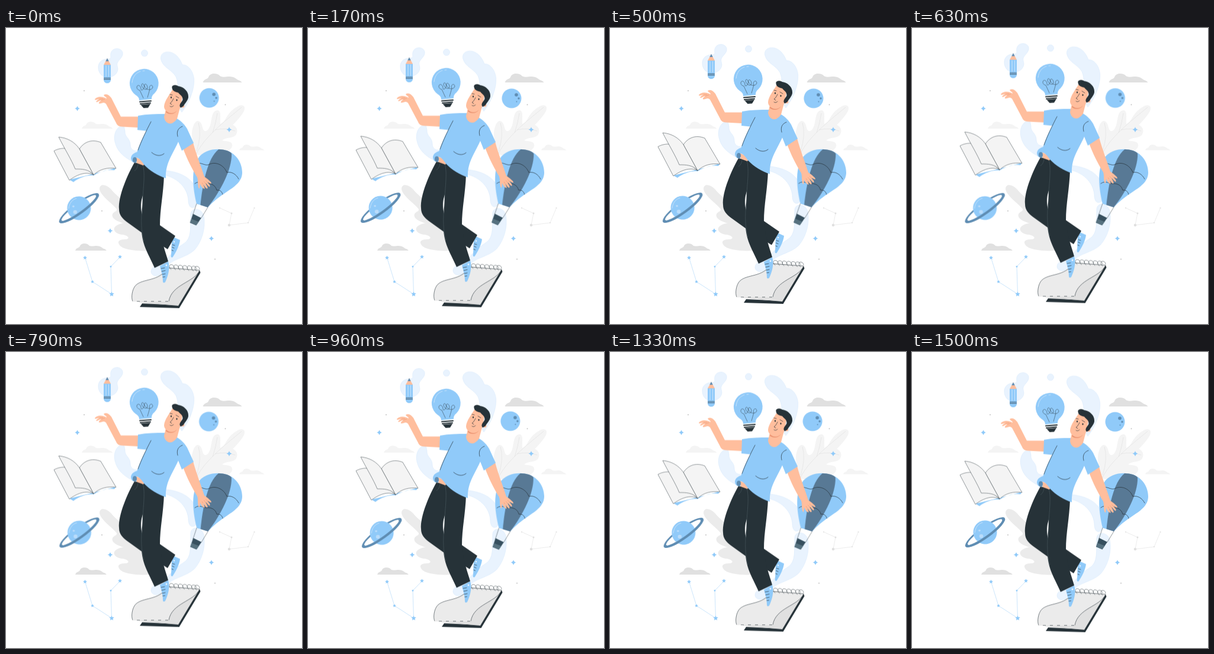
Recreate the animation shown at these times as an HTML page. Size 500 by 500 pixels, loop 1.54 s.

```html
<!DOCTYPE html>
<html lang="en">
<head>
<meta charset="utf-8">
<title>Floating ideas</title>
<style>
html, body { margin: 0; width: 100%; height: 100%; overflow: hidden; background: #fff; }
svg { display: block; width: 100vw; height: 100vh; }
.bob, .moon, .ringed, .balloon {
  animation: 770ms cubic-bezier(.37, 0, .63, 1) -435ms infinite alternate;
}
.bob { animation-name: bob; animation-delay: -45ms; }
.moon { animation-name: moon; }
.ringed { animation-name: ringed; }
.balloon { animation-name: balloon; transform-origin: 360px 245px; }
@keyframes bob { from { transform: translateY(.3px) } to { transform: translateY(-8.7px) } }
@keyframes moon { from { transform: translate(-1.4px, -1.4px) } to { transform: translate(1.2px, 1.1px) } }
@keyframes ringed { from { transform: translate(1.3px, 1.4px) } to { transform: translate(-1.2px, -1.2px) } }
@keyframes balloon { from { transform: rotate(-.7deg) } to { transform: rotate(.7deg) } }
.blue { fill: #90caf9 }
.steel { fill: #5f8db3 }
.dark { fill: #263238 }
.skin { fill: #ffbe9d }
.pale { fill: #e9f3fe; stroke: #d3e7fb; stroke-width: .5 }
.page { fill: #f4f4f4; stroke: #263238; stroke-width: .5; stroke-linejoin: round }
.ink { fill: none; stroke: #263238; stroke-width: .7; stroke-linecap: round; stroke-linejoin: round }
.fine { stroke-width: .5 }
.bold { stroke-width: 2 }
.vein { fill: none; stroke: #e0e0e0; stroke-width: .6 }
.glow { fill: none; stroke: #c8e4fc; stroke-width: 1; stroke-linecap: round }
</style>
</head>
<body>
<svg viewBox="0 0 500 500">
  <defs>
    <path id="cloud" d="M0 0C3 -8 8 -4 10 -10C13 -17 25 -16 29 -11C33 -8 40 -10 45 -10C53 -10 56 -6 60 -4C64 -3 65 -1 66 0Z"/>
    <path id="spark" d="M0 -4.6Q.9 -.9 4.6 0Q.9 .9 0 4.6Q-.9 .9 -4.6 0Q-.9 -.9 0 -4.6Z"/>
    <path id="star" d="M0 -4L1.2 -1.4L4 -1.1L1.9 .8L2.5 3.6L0 2.2L-2.5 3.6L-1.9 .8L-4 -1.1L-1.2 -1.4Z"/>
    <path id="loop" class="ink fine" d="M3 8C-1 6 -1 0 3 0C6 0 8 2 8 5"/>
  </defs>

  <!-- flowing backdrop -->
  <g class="bob pale">
    <path d="M177 49C174 32 194 31 197 41C199 51 185 55 188 64C192 75 182 83 172 83C160 83 155 73 156 64C158 53 168 52 174 52Q177 52 177 49Z"/>
    <circle cx="234" cy="42.300" r="5.500"/>
    <path d="M262 54C259 43 269 38 279 41C289 44 295 54 298 62C307 61 316 72 317.500 85C319 105 308 128 297 142L283 120C291 106 292 94 287 82C280 70 266 67 262 54Z"/>
    <path d="M199 164C187 166 181 178 184 192C187 207 199 219 216 226L240 226L235 205C218 211 210 206 210 197C210 186 200 184 201 174Z"/>
    <path d="M262 240C284 241 303 247 314 260C324 272 327 292 319 302C312 306 308 300 308 290C306 268 288 251 262 247Z"/>
    <path d="M312 314C313 302 331 304 334 317C338 339 330 361 319 374C304 389 279 389 270 405C264 421 247 422 245 412C245 400 259 403 270 393C281 376 289 372 303 362C314 352 311 335 312 314Z"/>
  </g>

  <!-- leaves -->
  <path fill="#f4f4f4" d="M322 214C319 200 310 183 316 167C320 153 329 154 332 168C334 177 340 176 344 167C348 158 346 140 357 139C365 139 361 154 362 162C370 160 372 147 382 139C391 131 400 127 403 134C404 142 394 152 383 164C390 166 393 174 388 181C383 187 371 184 365 190C371 192 384 190 382 200C379 210 360 210 348 218Z"/>
  <path class="vein" d="M322 212C334 186 366 160 398 134M322 208Q331 180 325 160M349 177Q354 163 357 144M353 172Q371 168 387 174"/>
  <path fill="#ebebeb" d="M158 271C159 262 170 264 178 273C188 285 199 290 206 308L234 320L266 336L268 368C258 379 207 379 194 369C185 360 192 357 202 357C211 356 206 350 196 349C185 348 179 340 185 335C190 331 195 330 199 330C189 327 177 322 180 314C182 310 188 310 187 306C181 297 158 283 158 271Z"/>

  <!-- sky -->
  <g fill="#e0e0e0">
    <use href="#cloud" x="332.500" y="92"/>
    <use href="#cloud" transform="translate(117 376) scale(.8)"/>
    <g fill="#f4f4f4">
      <use href="#cloud" transform="translate(128 170) scale(.79)"/>
      <use href="#cloud" transform="translate(394 206.500) scale(.64)"/>
    </g>
    <path class="vein" d="M361 304L381 313L377 333L409 329L419.500 304"/>
    <circle cx="361" cy="304" r="1"/><circle cx="381" cy="313" r="1.500"/>
    <circle cx="377" cy="333" r="2.300"/><circle cx="409" cy="329" r="1"/><circle cx="419.500" cy="304" r="1"/>
  </g>
  <g fill="#bdbdbd">
    <circle cx="132" cy="106" r=".9"/><circle cx="370.500" cy="129.500" r=".9"/>
    <circle cx="162" cy="309" r=".9"/><circle cx="353" cy="390.500" r=".9"/>
  </g>
  <g class="blue">
    <use href="#spark" x="120.500" y="136"/><use href="#spark" x="377" y="171.700"/>
    <use href="#spark" x="176" y="342.500"/><use href="#spark" x="347" y="355.500"/>
    <path fill="none" stroke="#b5dafa" stroke-width=".7" d="M133.500 388L146 428.500L178.500 449.500L177 403L192.500 387"/>
    <use href="#star" transform="translate(133.500 388) scale(.85)"/>
    <use href="#star" transform="translate(146 428.500) scale(.7)"/>
    <use href="#star" transform="translate(178.500 449.500) scale(1.05)"/>
    <use href="#star" transform="translate(177 403) scale(.5)"/>
    <use href="#star" transform="translate(192.500 386.500) scale(.85)"/>
  </g>

  <!-- planets -->
  <g class="moon">
    <circle class="blue" cx="343" cy="118" r="16.500"/>
    <circle class="steel" cx="351" cy="112" r="2.800"/><circle class="steel" cx="355" cy="118" r="1.700"/>
    <circle class="steel" cx="351.500" cy="123.500" r=".9"/>
  </g>
  <g class="ringed">
    <g transform="translate(123.500 304.500) rotate(-36)">
      <path class="steel" fill-rule="evenodd" d="M-41 0A41 10 0 0 1 41 0A41 10 0 0 1 -41 0ZM-36 -.5A36 6.500 0 0 0 36 -.5A36 6.500 0 0 0 -36 -.5Z"/>
      <circle class="blue" r="20"/>
      <path class="steel" d="M-41 0A41 10 0 0 0 41 0L36 -.5A36 6.500 0 0 1 -36 -.5Z"/>
    </g>
    <path class="glow" d="M106 305C107 296 112 290 119 288"/>
    <circle cx="114" cy="301.500" r="1.800" fill="#b9dcfb"/><circle cx="117" cy="311" r="3.300" fill="#b9dcfb"/>
  </g>

  <!-- balloon -->
  <g class="balloon">
    <path class="blue" d="M322 297C316 272 312 240 324 221C332 208 348 204 362 205C385 206 399 225 399 244C399 258 388 267 374 276C360 285 349 294 341 303Z"/>
    <path fill="#587995" d="M359 205C370 205 378 208 381 212C382 239 362 276 341 303L328.500 299C332 264 340 220 359 205Z"/>
    <path class="ink" d="M320 229C329 225 337 235 344 230C356 225 369 233 373 244C381 242 389 247 393 255M319 263C326 257 333 263 338 263C347 262 354 266 356 274C361 273 365 276 366 281"/>
    <path class="ink fine" d="M322 297L316 315M341 303L330 321"/>
    <path fill="#37505f" d="M316 314L330 321L321.500 333.500L311 329Z"/>
    <path fill="#56717f" d="M313.300 322.500L325.700 327.500L321.500 333.500L311 329Z"/>
  </g>

  <g class="bob">
    <!-- pencil -->
    <path class="blue" d="M165 62H177V87C177 95 165 95 165 87Z"/>
    <path class="skin" d="M165 62L171 51L177 62Z"/>
    <path class="steel" d="M168.300 56L171 51L173.700 56Z"/>
    <path fill="none" stroke="#d9edfd" stroke-width=".8" d="M169 63V82M173.500 63V82"/>
    <path class="ink" d="M165.500 84.300H176.500M165.500 86.500H176.500"/>

    <!-- bulb -->
    <path class="blue" d="M225 122C225 117 222 115 219 113A24.400 24.400 0 1 1 251 110C247 113 246 116 246 120Z"/>
    <path class="glow" d="M213 92C214 82 219 76 227 73M231 72.300L234 72"/>
    <path class="ink fine" d="M232 118L226 105C219 104 220 95 225 97C230 100 226 107 231 104C237 98 230 90 229 96C229 101 237 107 239 101C239 94 233 92 234 98C236 105 246 106 248 100C247 93 240 98 243 103L239 117"/>
    <path class="ink bold" d="M226 124.500L245 123M227 128L244 126.600"/>
    <path class="dark" d="M227.500 129.500L244 128L240 134.500L232.500 135Z"/>

    <!-- open book -->
    <path class="blue" d="M107 256L114 260C123 253 137 248 148 249C160 241 174 238 183 240L186 236L148 246Z"/>
    <path class="page" d="M81 207.500C87 204 93 203 99 203L148 248C135 241 119 248 107 257Z"/>
    <path class="page" d="M124 204C132 192 145 187 160 193L186 237C172 235 158 238 148 248Z"/>
    <path class="page" d="M89 184C103 185 116 192 124 204L148 248C140 238 128 238 117 238C111 223 98 202 89 184Z"/>

    <!-- notepad -->
    <path class="dark" d="M226 471L230 465L290 468L327 409L328.500 413L292.500 473Z"/>
    <path fill="#e0e0e0" d="M274 404L327 409L291 469L224 463Z"/>
    <path fill="#ebebeb" stroke="#263238" stroke-width=".6" d="M273 405L327 409C318 430 280 432 275 461.500H214C211 455 213 441 219 434.500C232 422 258 429 273 405Z"/>
    <path d="M214 461.500H275" fill="none" stroke="#ebebeb" stroke-width="1" stroke-dasharray="7 5"/>
    <use href="#loop" x="276" y="399.500"/><use href="#loop" x="283.500" y="400"/>
    <use href="#loop" x="291" y="400.500"/><use href="#loop" x="298.500" y="401"/>
    <use href="#loop" x="306" y="401.500"/><use href="#loop" x="313.500" y="402"/>
    <use href="#loop" x="319" y="402.300"/>

    <!-- shoes -->
    <path class="blue" d="M283 353L294 358C293 368 286 380 281.500 387C279 388 278 386 279 383C280 374 278 363 283 353Z"/>
    <path class="blue" d="M260 402L274 394C278 406 273 420 269 429C267 431 265 430 265 428C265 417 262 410 260 402Z"/>
    <path class="ink" d="M281 366L285 367M280.500 370L284 371.500M280 375L282.500 376M262 406L268 405M263 411L269 409.500M264 416L269 415M265 420.500L268.500 420"/>
    <circle cx="271" cy="400.500" r="1.500" fill="#e9f3fe"/><circle cx="284" cy="361" r="1.300" fill="#e9f3fe"/>

    <!-- trousers -->
    <path class="dark" d="M217 227C206 246 189 284 191 306C191 316 197 322 205 328L230 346L273 373.500L286 351L260 333L231 318C228 309 227 300 229 290L245 232Z"/>
    <path class="dark" d="M230 225L267 248C266 280 260 305 260 334C262 360 269 376 274 394L251 405C242 384 230 367 229 342C228 325 230 308 231 290Z"/>
    <path fill="none" stroke="#55646b" stroke-width=".5" d="M231 231C236 246 231 275 230 300C228 325 228 344 233 360M223 230C222 236 220 239 217 241"/>

    <!-- arms -->
    <path class="skin" d="M224 149.500L194 149.500L178 118C174 113 170 110 165 113C166 116 170 116 170 119C163 116 156 114 150 120C150 123 154 120 157 120C154 122 151 124 153 125C155 125 158 122 161 122C158 124 155 127 158 127.500C162 127 165 124 169 128L186 160C188 165 191 166 196 166.500L224 168Z"/>
    <path class="skin" d="M299 203L316 193C321 212 329 232 335 251C340 254 347 260 347 262C346 264 342 260 340 260C343 263 346 267 344 268C342 268 339 263 337 262C339 266 342 270 340 271C337 271 335 266 333 264C334 267 337 271 335 271.500C331 270 329 266 328 263C327 267 328 271 326 271C323 265 325 258 323 252C315 239 306 222 299 203Z"/>
    <path fill="none" stroke="#e58f6b" stroke-width=".5" d="M161 122L167 120M158 120L164 119M337 262L334 259M333 264L331 261M340 260L337 257"/>

    <!-- shirt -->
    <path class="skin" d="M219 218L236 226L232 232L221 228Z"/>
    <path class="blue" d="M223 148C238 145 253 145 268 145L289 153C296 157 302 163 306 170L317 194L297 207L291 192C280 216 269 229 270 253.500C256 249 243 241 233 230.500C228 223 223 218 219 219C218 223 221 226 220 227C213 229 209 221 212 216C214 212 219 210 221.500 209C226 195 231 184 237 173.500L222 172Z"/>
    <ellipse class="steel" cx="217.500" cy="222.500" rx="3.500" ry="4.500"/>
    <path class="ink" d="M245 158C237 173 228 192 223 206M246 210C253 216 261 217 267 212M290 183C288 175 290 169 298 166"/>

    <!-- head -->
    <path class="skin" d="M270 137L267 150C268 159 275 163 281 160.500Q286 158 289 153L294 134Z"/>
    <path d="M270.500 140C276 145 283 145 289 139.500C283 147 275 146 270 142Z" fill="#e9906e"/>
    <path class="skin" d="M281 104C276 113 268 122 267 132C267 139 273 142 279 141.500C288 141 293 137 295 133L299 109Z"/>
    <circle class="skin" cx="298.500" cy="131.500" r="3"/>
    <path class="dark" d="M280.500 101C279 96 287 95 291 98C300 99 309 107 308 117C307 123 302 127 299.500 132L295 134.500L293.500 132C293 127 297 125 298.500 121C299 115 294 113 291 109C286 108 281 106 280.500 101Z"/>
    <path class="ink" d="M277 112L281 113M287 115L292 118M283 119C281 123 279 126 277 127L280 129M277 132C279 133.500 281 133 283 131"/>
    <ellipse class="dark" cx="279" cy="117" rx="1.100" ry="1.600"/><ellipse class="dark" cx="288.500" cy="121.500" rx="1.100" ry="1.600"/>
  </g>
</svg>
</body>
</html>
```
